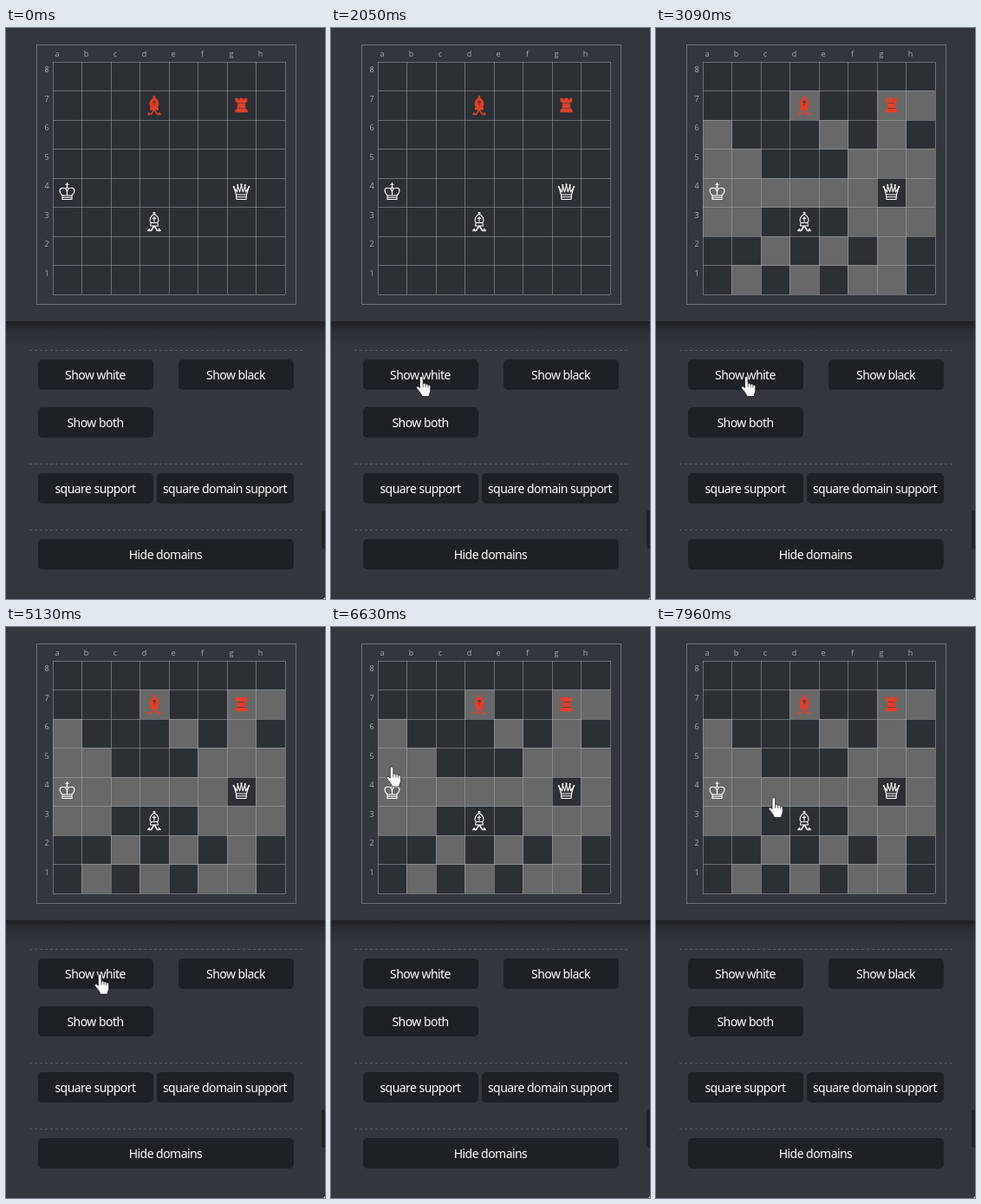
These frames come from a looping animation (368x658 px, 8000 ms). An HTML page:

```html
<!DOCTYPE html>
<html lang="en">
<head>
<meta charset="utf-8">
<title>Chess domains</title>
<style>
  html, body { margin: 0; width: 100%; height: 100%; overflow: hidden; background: #33363d; }
  svg { display: block; width: 368px; height: 658px; }
  text { font-family: "Noto Sans", "Open Sans", sans-serif; text-anchor: middle; }
  .label { font-family: "Open Sans", sans-serif; font-size: 9px; fill: #a9abae; }
  .button rect { fill: #1d2024; }
  .button text { font-size: 14px; font-weight: 500; letter-spacing: -.55px; fill: #fff; }
  .grid { fill: none; stroke: #a8abae; stroke-opacity: .5; }
  .rule { stroke: #575b61; stroke-dasharray: 3 3; }
  .piece { fill: none; stroke: #fff; stroke-width: 1.1; stroke-linejoin: round; stroke-linecap: round; }
  .red { fill: #e0402b; stroke: #e0402b; }
  .detail { fill: none; stroke: #2c2f34; stroke-width: .8; }
</style>
</head>
<body>
<svg viewBox="0 0 368 658">
  <defs>
    <linearGradient id="shade" x2="0" y2="1">
      <stop offset="0" stop-color="#15171a" stop-opacity=".75"/>
      <stop offset=".4" stop-color="#1c1f22" stop-opacity=".3"/>
      <stop offset="1" stop-color="#1c1f22" stop-opacity="0"/>
    </linearGradient>
    <radialGradient id="glow">
      <stop offset="0" stop-color="#999" stop-opacity=".14"/>
      <stop offset="1" stop-color="#aaa" stop-opacity=".27"/>
    </radialGradient>
    <g id="bishop">
      <circle cy="-9.8" r="1"/>
      <path d="M0-8.500C-4-6.500-6.500-2.500-3.800 1.500H3.800C6.500-2.500 4-6.500 0-8.500ZM-3.800 1.500-4.500 5H4.500L3.800 1.500Z"/>
      <path fill="none" stroke-width="1.500" d="M-.5 5.500-3.500 10.500H-7.200L-5.500 8.800M.5 5.500 3.500 10.500H7.200L5.500 8.800"/>
    </g>
    <path id="cross" d="M0-5.500V0M-1.800-3.600H1.800"/>
  </defs>

  <rect y="338" width="368" height="30" fill="url(#shade)"/>
  <rect x="35.500" y="19.500" width="299" height="299" class="grid"/>
  <rect x="54" y="39" width="268" height="268" fill="#2c2f34"/>
  <g id="domain" fill="#686868"></g>
  <path id="lines" class="grid"/>
  <g id="labels"></g>

  <g class="piece" transform="translate(70.500 189)">
    <path d="M0-10.500V-5.500M-1.800-8.700H1.800M-5.500 4C-10-.5-9-4.800-5-4.800-2-4.800 0-3 0 1 0-3 2-4.800 5-4.800 9-4.800 10-.5 5.500 4ZM-5.500 4V8.500H5.500V4M-5.500 6.300H5.500M-1.500-4 0-5.500 1.500-4M0 1V4"/>
  </g>
  <g class="piece" transform="translate(271.500 189)">
    <path d="M-8.500-5.500-6 3H6L8.500-5.500 5 0 4.200-7 1.800 0 0-8-1.800 0-4.200-7-5 0ZM-6 3-5.500 8.500H5.500L6 3M-5.500 5.800H5.500"/>
    <path stroke-width="2.200" d="M-8.800-6h0M-4.300-8h0M0-8.600h0M4.300-8h0M8.800-6h0"/>
  </g>
  <g class="piece" transform="translate(171 223)"><use href="#bishop"/><use href="#cross"/></g>
  <g class="piece red" transform="translate(171 89)">
    <use href="#bishop"/>
    <g class="detail"><use href="#cross"/></g>
  </g>
  <g class="piece red" transform="translate(271.500 89)">
    <path stroke-width=".6" d="M-6.500-8h2.800v1.800h2V-8h3.400v1.800h2V-8h2.800v3.800L4-2.500 4.500 3.500 6.800 5.500V8H-6.800V5.500L-4.500 3.500-4-2.500-6.500-4.200Z"/>
    <path class="detail" stroke-opacity=".6" d="M-3.500-2.500H3.500M-4 3.500H4"/>
  </g>

  <path class="rule" d="M27 371.500H342M27 502.500H342M27 578.500H342"/>
  <rect x="364" y="556" width="10" height="44" rx="3" fill="#1f2226"/>
  <path d="M368 656V658H366Z" fill="#ccc"/>
  <g id="buttons"></g>

  <circle id="ripple" cx="101.500" cy="400" r="29" fill="url(#glow)"/>
  <g id="hand">
    <path fill="#fff" stroke="#222529" stroke-width=".8" d="M4.500 2.300a1.800 1.800 0 0 1 3.600 0V9c1-.8 2.800-.6 3 .7 1-.7 2.600-.3 2.800.9 1.200-.5 2.800 0 2.800 1.600V17c0 2-1.200 3.200-1.500 4.500v2H6.500V22C5.500 20 3 16.500.9 14.200-.1 12.600 1.800 11.200 3.200 12.400L4.500 13.800Z"/>
    <path class="detail" stroke-width=".6" d="M8.100 9V13M11.100 9.700V13M13.900 10.600V13.500"/>
  </g>
</svg>
<script>
const $ = id => document.getElementById(id);
const CELL = 33.5, LEFT = 53.5, TOP = 38.5, LOOP = 8000;
const SHOW = 2900, FADE = 3020, BACK = 3090, FRAME = 70;
const FILES = 'abcdefgh';
const gridX = col => Math.round(LEFT + col * CELL);
const gridY = row => Math.round(TOP + row * CELL);

// Squares reached by the white pieces; a piece in the way ends a line of sight
function whiteDomain() {
  const white = { K: 'a4', Q: 'g4', B: 'd3' };
  const taken = [...Object.values(white), 'd7', 'g7'];
  const reached = new Set();
  for (const [kind, at] of Object.entries(white)) {
    for (let dx = -1; dx <= 1; dx++) for (let dy = -1; dy <= 1; dy++) {
      if (!dx && !dy || kind === 'B' && !(dx && dy)) continue;
      let col = FILES.indexOf(at[0]), rank = +at[1], square;
      do {
        col += dx;
        rank += dy;
        if (!FILES[col] || rank < 1 || rank > 8) break;
        square = FILES[col] + rank;
        reached.add(square);
      } while (kind !== 'K' && !taken.includes(square));
    }
  }
  return [...reached];
}

function drawBoard() {
  let labels = '', lines = '';
  for (let i = 0; i <= 8; i++) {
    lines += `M${gridX(i) + .5} 39V307M54 ${gridY(i) + .5}H322`;
    if (i === 8) break;
    labels += `<text class="label" x="${59 + i * CELL}" y="33">${FILES[i]}</text>`;
    labels += `<text class="label" x="47" y="${51 + i * CELL}">${8 - i}</text>`;
  }
  $('domain').innerHTML = whiteDomain().map(([file, rank]) =>
    `<rect x="${gridX(FILES.indexOf(file))}" y="${gridY(8 - rank)}" width="34" height="34"/>`).join('');
  $('labels').innerHTML = labels;
  $('lines').setAttribute('d', lines);
}

function drawButton(name, x, y, w = 133) {
  $('buttons').innerHTML +=
    `<g class="button"><rect x="${x}" y="${y}" width="${w}" height="35" rx="5"/>` +
    `<text x="${x + w / 2 - .5}" y="${y + 22.5}">${name}</text></g>`;
}

// Pointer path: start, end, x, y and, for long sweeps, the bend
const entry = [294, 546];
const moves = [
  [970, 1510, 99, 390, 175, 450],
  [1750, 1820, 99, 399],
  [2050, 2050, 98, 401],
  [5130, 5900, 68, 207, 200, 365],
  [6000, 6070, 67, 195],
  [6320, 6460, 66, 132],
  [6630, 6700, 63, 170],
  [6870, 7740, 164, 218, 92, 143],
  [7890, 7960, 129.5, 196]
];

const smooth = u => u * u * (3 - 2 * u);
const easeOut = u => u * (2 - u);

function handAt(t) {
  let from = entry;
  for (const [start, end, x, y, bx, by] of moves) {
    if (t < start) break;
    const steps = Math.round((end - start) / FRAME) + 1;
    const gap = (end - start) / (steps - 1) || 1;
    const part = Math.min(1, (Math.floor((t - start) / gap + .001) + 1) / steps);
    const u = bx ? smooth(part) : easeOut(part), v = 1 - u;
    const to = [x, y];
    const bend = bx ? [bx, by] : from.map((a, i) => (a + to[i]) / 2);
    from = from.map((a, i) => a * v * v + 2 * bend[i] * u * v + to[i] * u * u);
  }
  return from;
}

function show(id, on) {
  $(id).setAttribute('visibility', on ? 'visible' : 'hidden');
}

function render(t) {
  const clicked = t >= SHOW && t < BACK;
  show('domain', t >= SHOW);
  show('ripple', clicked);
  $('ripple').setAttribute('opacity', t < FADE ? 1 : .5);
  show('hand', t >= moves[0][0] && !clicked);
  $('hand').setAttribute('transform', `translate(${handAt(t)})`);
}

drawBoard();
drawButton('Show white', 37, 382);
drawButton('Show black', 199, 382);
drawButton('Show both', 37, 437);
drawButton('square support', 37, 513);
drawButton('square domain support', 174, 513, 158);
drawButton('Hide domains', 37, 589, 295);

const begin = performance.now();
function tick() {
  render((performance.now() - begin) % LOOP);
  requestAnimationFrame(tick);
}
tick();
</script>
</body>
</html>
```
